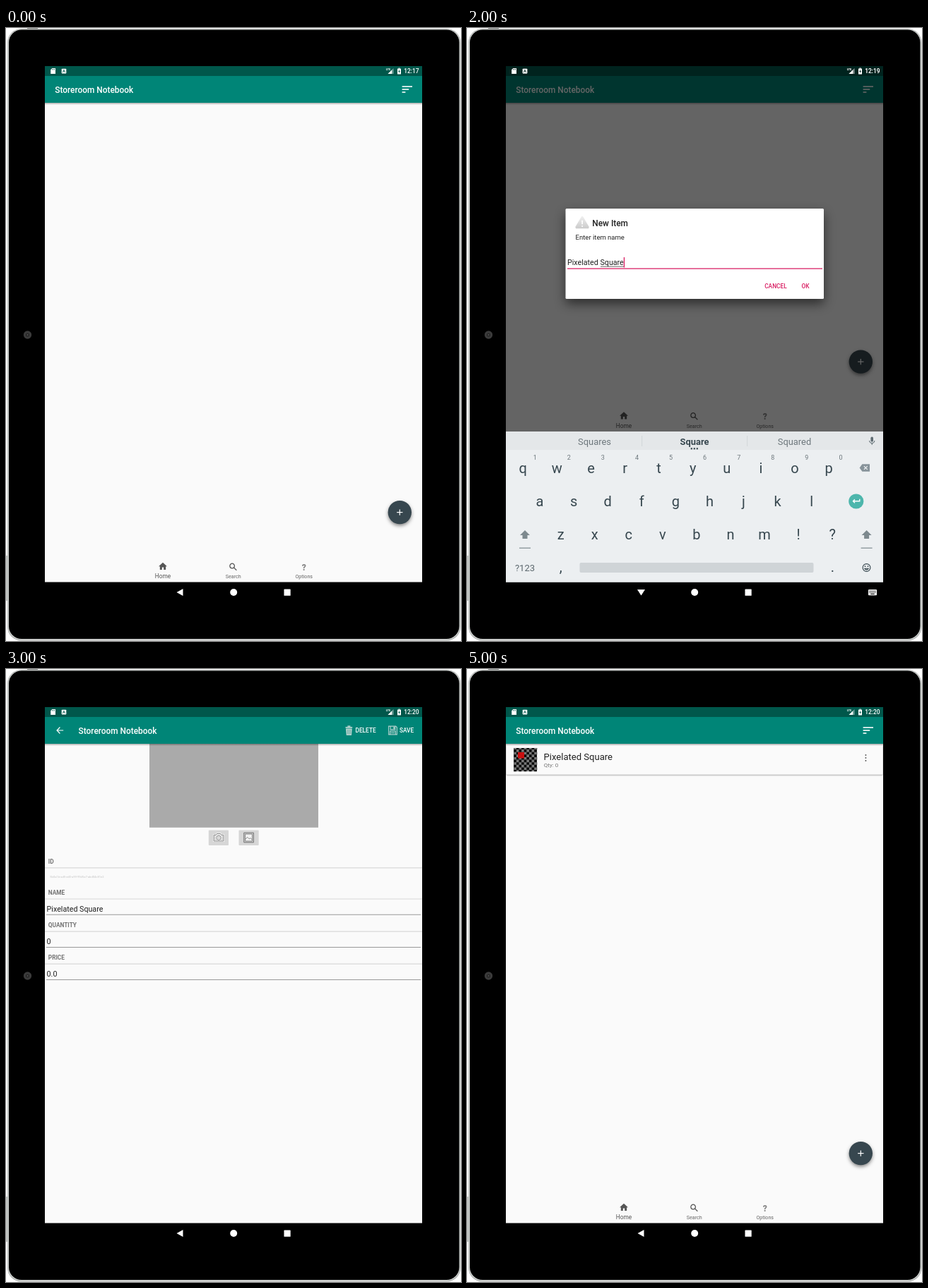
These frames come from a looping animation (644 by 869 pixels, 6 s). An HTML page with a canvas:

```html
<!DOCTYPE html>
<html lang="en">
<head>
<meta charset="utf-8">
<title>Storeroom Notebook</title>
<style>
html, body { margin: 0; width: 100%; height: 100%; overflow: hidden; background: #fff; }
canvas { display: block; width: 644px; height: 869px; }
</style>
</head>
<body>
<canvas id="stage"></canvas>
<script>
const canvas = document.getElementById('stage');
const ctx = canvas.getContext('2d');
const dpr = window.devicePixelRatio || 1;
canvas.width = 644 * dpr;
canvas.height = 869 * dpr;

const LOOP = 6000, STEP = 1000;
const L = 55, R = 589, TOP = 54, BOTTOM = 785.5;
const KEYS_TOP = 572;
const APP = 'Storeroom Notebook', ITEM = 'Pixelated Square';
const TEAL = '#008577', PINK = '#d81b60', SLATE = '#37474f';

function rect(x, y, w, h, color, r = 0) {
  ctx.fillStyle = color;
  ctx.beginPath();
  ctx.roundRect(x, y, w, h, r);
  ctx.fill();
}
function disc(x, y, r, color) {
  ctx.fillStyle = color;
  ctx.beginPath();
  ctx.arc(x, y, r, 0, Math.PI * 2);
  ctx.fill();
}
function poly(points, color) {
  ctx.fillStyle = color;
  ctx.beginPath();
  points.forEach(([x, y]) => ctx.lineTo(x, y));
  ctx.closePath();
  ctx.fill();
}
function text(str, x, y, size, color, weight = 400, align = 'left') {
  ctx.font = `${weight} ${size}px Roboto, sans-serif`;
  ctx.fillStyle = color;
  ctx.textAlign = align;
  ctx.fillText(str, x, y);
}
// Fills, or strokes when a width is given, a path on a 24-unit grid centred at x, y.
function icon(d, x, y, scale, color, width = 0) {
  ctx.save();
  ctx.translate(x, y);
  ctx.scale(scale, scale);
  ctx.translate(-12, -12);
  const path = new Path2D(d);
  if (width) {
    ctx.strokeStyle = color;
    ctx.lineWidth = width;
    ctx.stroke(path);
  } else {
    ctx.fillStyle = color;
    ctx.fill(path, 'evenodd');
  }
  ctx.restore();
}
function shadowed(blur, dy, alpha, draw) {
  ctx.save();
  ctx.shadowColor = `rgba(0,0,0,${alpha})`;
  ctx.shadowBlur = blur * dpr;
  ctx.shadowOffsetY = dy * dpr;
  draw();
  ctx.restore();
}

function device() {
  rect(0, 0, 644, 869, '#fff');
  rect(30, 0, 15, 2, '#8c8f8d');
  rect(0, 748, 3, 64, '#c4c7c5');
  rect(2, 1, 641.5, 867.5, '#a9acaa', 20);
  rect(2.8, 1.8, 639.8, 865.6, '#d5d8d6', 19);
  rect(4, 2.5, 637.5, 863.5, '#000', 18);
  disc(30.5, 435, 5.7, '#3b3b3b');
  disc(30.5, 435, 2.6, '#272727');
  disc(30.5, 435, 1, '#555');
}

function navBar(typing) {
  poly(typing ? [[241, 796], [252, 796], [246.5, 804.5]]
              : [[241.5, 800], [250.5, 795], [250.5, 805]], '#fff');
  disc(322.2, 800, 5, '#fff');
  rect(393.5, 795.5, 9.2, 9.2, '#fff', 0.5);
  if (!typing) return;
  rect(568, 796, 12, 8.2, '#fff', 1);
  for (let i = 0; i < 5; i++) {
    rect(569.4 + i * 2, 797.6, 1.1, 1.1, '#000');
    rect(569.4 + i * 2, 799.6, 1.1, 1.1, '#000');
  }
  rect(571.2, 801.8, 5.6, 1.1, '#000');
}

function statusIcons(time, back) {
  poly([[65.3, 57], [70, 57], [70, 65], [63.2, 65], [63.2, 59.2]], '#fff');
  for (let i = 0; i < 3; i++) rect(65.3 + i * 1.4, 58, 0.7, 1.6, back);
  rect(78.7, 57.7, 6.6, 6.8, '#fff', 0.8);
  text('A', 82, 63.4, 5.8, back, 700, 'center');
  text('LTE', 537.8, 60, 4, '#fff', 700);
  poly([[548.5, 57], [548.5, 65], [540.5, 65]], 'rgba(255,255,255,.45)');
  poly([[546, 59.5], [546, 65], [540.5, 65]], '#fff');
  rect(554, 57.4, 5, 8.2, '#fff', 0.7);
  rect(555.5, 56.6, 2, 1, '#fff');
  poly([[556.9, 58.8], [555.2, 62], [556.3, 62], [556.1, 64.3], [557.9, 61.1], [556.8, 61.1]], back);
  text(time, 584.6, 64, 8.4, '#fff', 500, 'right');
}

function screen(color) {
  rect(L, TOP, R - L, BOTTOM - TOP, color);
}
function appBar(titleX) {
  rect(L, TOP, R - L, 14, '#00574b');
  const fade = ctx.createLinearGradient(0, 106, 0, 109);
  fade.addColorStop(0, 'rgba(0,0,0,.32)');
  fade.addColorStop(1, 'rgba(0,0,0,0)');
  rect(L, 106, R - L, 3, fade);
  rect(L, 68, R - L, 38, TEAL);
  text(APP, titleX, 91.7, 11.88, '#fff', 500);
}
function sortIcon() {
  [14.4, 9.6, 4.8].forEach((w, i) => rect(560.6, 82.2 + i * 4, w, 1.6, '#fff'));
}

function tabs(dy) {
  icon('M10 20v-6h4v6h5v-8h3L12 3 2 12h3v8z', 222, 763.2 + dy, 0.594, '#555');
  icon('M15 9.5a5.5 5.5 0 1 0-11 0a5.5 5.5 0 1 0 11 0M13.4 13.4L20 20', 321.6, 764 + dy, 0.594, '#555', 2.1);
  text('?', 421.8, 768.6 + dy, 12, '#888', 900, 'center');
  text('Home', 222, 780 + dy, 8.3, '#555', 400, 'center');
  text('Search', 321.8, 780 + dy, 7.13, '#666', 400, 'center');
  text('Options', 421.7, 780 + dy, 7.13, '#666', 400, 'center');
}

function fab(dy, open) {
  shadowed(5, 2.5, 0.45, () => disc(557.3, 686.6 + dy, 16.7, SLATE));
  ctx.save();
  ctx.translate(557.3, 686.6 + dy);
  if (open) ctx.rotate(Math.PI / 4);
  rect(-4.15, -0.6, 8.3, 1.2, '#fff');
  rect(-0.6, -4.15, 1.2, 8.3, '#fff');
  ctx.restore();
}

function home(time, { color = '#fafafa', dy = 0, open = false } = {}) {
  screen(color);
  appBar(69.3);
  sortIcon();
  tabs(dy);
  fab(dy, open);
  statusIcons(time, '#00574b');
}

function addMenu() {
  home('12:19', { color: '#fdfdfd', open: true });
  shadowed(1.5, 0.8, 0.35, () => rect(536, 641, 45, 16.3, '#fdfdfd', 1));
  rect(535, 640, 47, 15, '#fdfdfd');
  text('Add Item', 558, 652.2, 8.3, '#555', 400, 'center');
}

function dialog() {
  shadowed(16, 7, 0.55, () => rect(139.5, 256, 365.5, 128, '#fff', 1.5));
  const grey = ctx.createLinearGradient(0, 267, 0, 285);
  grey.addColorStop(0, '#efefef');
  grey.addColorStop(1, '#c9c9c9');
  poly([[162.2, 267], [164, 267], [172.8, 282], [172, 284.3], [154, 284.3], [153.3, 282]], grey);
  rect(162.3, 272.5, 1.7, 6, '#fff', 0.8);
  disc(163.1, 281, 1, '#fff');
  text('New Item', 177.3, 280.6, 11.88, '#212121', 500);
  text('Enter item name', 153.6, 300.2, 9.5, '#212121');
  text(ITEM, 142, 336.2, 10.7, '#212121');
  rect(189, 337.8, 33, 0.8, '#333');
  rect(221.8, 325, 1.3, 14.5, PINK);
  rect(142, 340.4, 361, 1.3, PINK);
  text('CANCEL', 421.2, 369, 8.3, PINK, 500);
  text('OK', 473.4, 369, 8.3, PINK, 500);
}

function keyRow(chars, x, y) {
  [...chars].forEach((c, i) => text(c, x + i * 48.08, y, 20, SLATE, 400, 'center'));
}
function keyboard() {
  const soft = '#7d898e';
  rect(L, KEYS_TOP, R - L, BOTTOM - KEYS_TOP, '#eceff1');
  rect(L, KEYS_TOP, R - L, 26, '#e4e7e9');
  text('Squares', 180.5, 591, 12.9, '#6d777c', 400, 'center');
  text('Square', 322, 591, 12.9, SLATE, 700, 'center');
  text('Squared', 463.5, 591, 12.9, '#6d777c', 400, 'center');
  for (const x of [247.3, 396.3]) rect(x, 578, 0.8, 15, '#cdd2d5');
  for (let i = 0; i < 3; i++) rect(316.7 + i * 4, 595.2, 2.2, 2.2, SLATE);
  icon('M12 14a3 3 0 0 0 3-3V5a3 3 0 0 0-6 0v6a3 3 0 0 0 3 3z', 573.2, 585.5, 0.6, '#5f6c72');
  icon('M6 11a6 6 0 0 0 12 0M12 17v4', 573.2, 585.5, 0.6, '#5f6c72', 1.8);

  keyRow('qwertyuiop', 79.3, 631);
  [...'1234567890'].forEach((c, i) => text(c, 96.2 + i * 48.08, 611.6, 9, '#6d777c', 400, 'center'));
  keyRow('asdfghjkl', 103, 678);
  keyRow('zxcvbnm!?', 132.6, 725.3);

  poly([[555.6, 623.5], [559.4, 618.3], [570, 618.3], [570, 628.7], [559.4, 628.7]], '#87939a');
  icon('M8 8l8 8M16 8l-8 8', 564.3, 623.5, 0.6, '#eceff1', 2.2);
  disc(550.8, 671, 10.6, '#4db6ac');
  icon('M20 7v5H5M9 8l-4 4l4 4', 550.8, 670.8, 0.62, '#fff', 2.2);
  for (const x of [82, 565.6]) {
    poly([[x, 712], [x + 7, 719], [x + 3.5, 719], [x + 3.5, 724], [x - 3.5, 724], [x - 3.5, 719], [x - 7, 719]], soft);
    rect(x - 8, 736.6, 16, 1.2, soft);
  }
  text('?123', 82, 770, 13, '#5b676d', 400, 'center');
  text(',', 132.6, 770.5, 20, SLATE, 400, 'center');
  rect(159.5, 758, 331, 14, '#cfd4d7', 2);
  text('.', 517.4, 770.5, 20, SLATE, 400, 'center');
  icon('M21 12a9 9 0 1 0-18 0a9 9 0 1 0 18 0M7.5 14a5 5 0 0 0 9 0z', 565.5, 765, 0.6, SLATE, 1.9);
  disc(563.5, 763.2, 0.9, SLATE);
  disc(567.5, 763.2, 0.9, SLATE);
}

function naming() {
  home('12:19', { dy: KEYS_TOP - BOTTOM });
  rect(L, TOP, R - L, KEYS_TOP - TOP, 'rgba(0,0,0,.6)');
  statusIcons('12:19', '#00231e');
  dialog();
  keyboard();
}

function checker(x, y, w, h, x0, y0, cell) {
  ctx.save();
  ctx.beginPath();
  ctx.rect(x, y, w, h);
  ctx.clip();
  rect(x, y, w, h, '#777');
  const firstCol = Math.floor((x - x0) / cell), firstRow = Math.floor((y - y0) / cell);
  for (let j = firstRow; y0 + j * cell < y + h; j++)
    for (let i = firstCol; x0 + i * cell < x + w; i++)
      if ((i + j) % 2) rect(x0 + i * cell, y0 + j * cell, cell, cell, '#080808');
  ctx.restore();
}

function imageButtons() {
  const line = '#6f6f6f';
  for (const x of [286.8, 329.5]) rect(x, 228.5, 28.2, 21.5, '#d6d6d6', 1);
  icon('M1 6h5l2-3h8l2 3h5v14H1zM17 12.5a5 5 0 1 0-10 0a5 5 0 1 0 10 0', 301, 239, 0.62, '#fff', 3.4);
  icon('M1 6h5l2-3h8l2 3h5v14H1zM17 12.5a5 5 0 1 0-10 0a5 5 0 1 0 10 0', 301, 239, 0.62, line, 1.4);
  icon('M1 1h22v22H1z', 343.6, 239, 0.62, line, 1.6);
  icon('M4 4h16v16H4z', 343.6, 239, 0.62, '#f2f2f2');
  icon('M4 4h16v16H4zM4 16l5-5l4 4l3-2l4 4', 343.6, 239, 0.62, line, 1.3);
}

function field(label, y, value) {
  text(label, 59.8, y, 8.3, '#757575', 700);
  rect(L, y + 5.6, R - L, 1.2, '#d9d9d9');
  if (!value) return;
  text(value, 57.6, y + 24, 10.7, '#212121');
  rect(57, y + 28, 530, 0.9, '#999');
}

function detail(photo) {
  screen('#fafafa');
  if (photo) {
    checker(203, 106, 239, 118.7, 220.5, 125, 18.05);
    rect(267.6, 106, 45, 45.6, '#c81010');
  } else {
    rect(203, 106, 239, 118.7, '#aaa');
  }
  appBar(102.6);
  statusIcons('12:20', '#00574b');
  icon('M20 12H5M12 4.5L4.8 12l7.2 7.5', 76.4, 87, 0.6, '#fff', 2);

  const pale = '#b5d3cf';
  rect(480.4, 82, 10, 1.8, pale, 0.8);
  rect(483.4, 80.3, 4, 1.6, pale);
  poly([[481, 84.6], [489.8, 84.6], [489, 94], [481.8, 94]], pale);
  for (let i = 0; i < 3; i++) rect(483 + i * 2, 86, 0.7, 6.5, '#4f9d94');
  text('DELETE', 494.5, 90.2, 8.3, '#fff', 500);
  icon('M1.5 1.5h18l3 3v18h-21zM6 2v8h12V2M5 22v-8h14v8', 547.5, 87, 0.56, pale, 1.9);
  rect(548.4, 82, 1.7, 3, pale);
  rect(544.6, 90, 5.8, 1, pale);
  text('SAVE', 556.9, 90.2, 8.3, '#fff', 500);

  imageButtons();
  field('ID', 275.6);
  text('5b0a1b-ad5-ed0-a99-99d5a7-abd04c81e2', 62.3, 296.2, 4.1, '#c2c2c2');
  field('NAME', 319.8, ITEM);
  field('QUANTITY', 366, '0');
  field('PRICE', 412, '0.0');
}

function listed() {
  home('12:20');
  shadowed(2, 0.8, 0.4, () => rect(L + 0.5, 108.3, R - L - 1, 41.5, '#fafafa', 1.5));
  checker(66, 112, 33.2, 33.2, 62.6, 121.3, 3.62);
  rect(72, 118, 9, 8.6, '#c81010');
  text(ITEM, 108.6, 129.4, 13.05, '#212121');
  text('Qty: 0', 108.8, 139.2, 8, '#757575');
  for (let i = 0; i < 3; i++) disc(564.4, 122 + i * 4, 0.95, '#555');
}

const scenes = [
  () => home('12:17'),
  addMenu,
  naming,
  () => detail(false),
  () => detail(true),
  listed
];

const start = performance.now();
function frame() {
  const t = (performance.now() - start) % LOOP;
  const index = Math.floor(t / STEP);
  ctx.setTransform(dpr, 0, 0, dpr, 0, 0);
  device();
  navBar(scenes[index] === naming);
  scenes[index]();
  requestAnimationFrame(frame);
}
frame();
</script>
</body>
</html>
```
